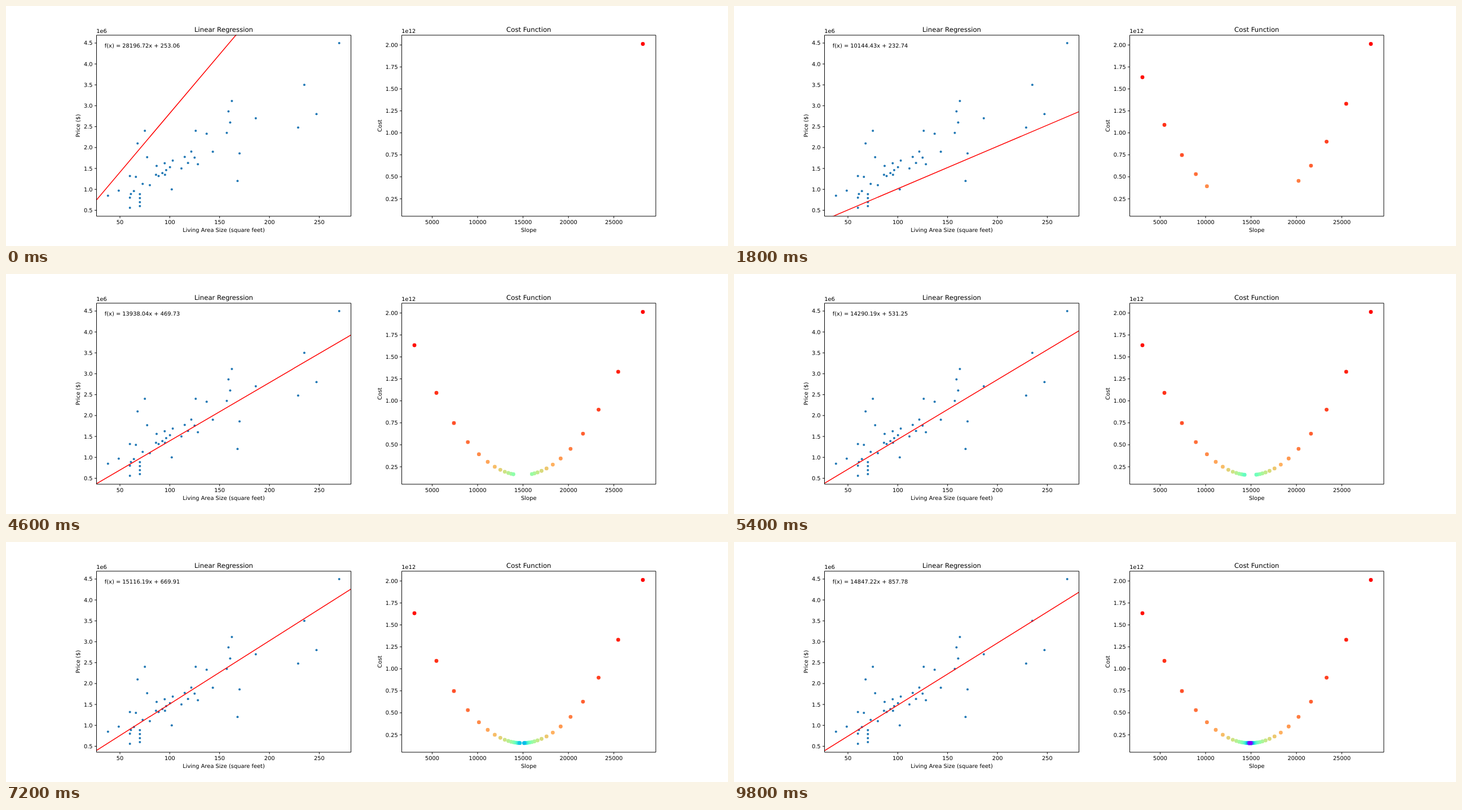
Animation, 1280 px wide and 427 px high, one loop 10 s. Source, as an HTML page:

```html
<!DOCTYPE html>
<html lang="en">
<head>
<meta charset="utf-8">
<title>Gradient descent</title>
<style>
  html, body { margin: 0; width: 100%; height: 100%; overflow: hidden; background: #fff; }
  svg { display: block; width: 1280px; height: 427px; }
  text { font: 9.877px "DejaVu Sans", sans-serif; text-rendering: geometricPrecision; fill: #000; white-space: pre; }
  .title { font-size: 11.7px; }
  .mid { text-anchor: middle; }
  .end { text-anchor: end; }
  .axis { fill: none; stroke: #000; stroke-width: 0.98; }
  .house { fill: #1f77b4; }
</style>
</head>
<body>
<svg id="stage" viewBox="0 0 1280 427">
  <clipPath id="plot"><rect x="160" y="51.2" width="451" height="322.4"/></clipPath>
</svg>
<script>
const STEP = 200, STEPS = 50;
const TOP = 51.9, BOTTOM = 374;
const stage = document.getElementById('stage');

function add(tag, attrs, text) {
  const el = document.createElementNS('http://www.w3.org/2000/svg', tag);
  for (const name in attrs) el.setAttribute(name, attrs[name]);
  if (text) el.textContent = text;
  return stage.appendChild(el);
}

const range = (from, step, n) => Array.from({ length: n }, (_, i) => from + i * step);

// Data to pixel scales
const areaX = v => 160.3 + (v - 26.4) * 1.767;
const priceY = v => 373.6 - (v - 0.363) * 74.37;
const slopeX = v => 755.6 + (v - 5000) * 0.0161;
const costY = v => 343 - (v - 0.25) * 156.4;

// House by area and price in millions
const house = (area, price) =>
  add('circle', { cx: areaX(area), cy: priceY(price), r: 2, class: 'house' });

// Evenly spaced houses, every second one raised by zig
function run(n, area, price, dArea, dPrice, zig = 0) {
  for (let i = 0; i < n; i++)
    house(area + i * dArea, price + i * dPrice + (i % 2) * zig);
}

function drawHouses() {
  run(2, 38, 0.85, 10.8, 0.12);
  run(2, 60, 0.56, 0, 0.24);
  run(2, 61, 0.89, 3, 0.07);
  run(2, 60, 1.32, 6, -0.02);
  run(4, 70, 0.6, 0, 0.095);
  run(2, 72.8, 1.13, 7.2, -0.03);
  run(2, 86.2, 1.35, 9, 0);
  run(3, 86.8, 1.56, 8.1, 0.065);
  run(4, 88.8, 1.32, 3.8, 0.07);
  run(5, 111.7, 1.5, 3.3, 0.065, 0.21);
  run(4, 157.2, 2.35, 1.7, 0.125, 0.39);
  const strays = [
    [67.7, 2.1], [75, 2.4], [77.3, 1.77], [102, 1], [126, 2.4], [128.2, 1.6],
    [137, 2.33], [143.2, 1.9], [168, 1.2], [170, 1.86], [186.3, 2.7],
    [228.8, 2.48], [235, 3.5], [247.2, 2.8], [270, 4.5]
  ];
  strays.forEach(p => house(...p));
}

// Overshooting descent: the slope flips sides each step, the intercept drifts
function fit(k) {
  const swing = 13294.06 * Math.exp(-0.114186 * k) * (k % 2 ? -1 : 1);
  const drift = 14.6535 * k - 0.00034 * k * k;
  return {
    swing,
    slope: 14902.664 - 0.00843 * drift + swing,
    bias: 140.992 + drift + 0.00843 * swing
  };
}

function rainbow(x) {
  const rgb = [Math.abs(2 * x - 0.5), Math.sin(Math.PI * x), Math.cos(Math.PI * x / 2)];
  return `rgb(${rgb.map(c => Math.round(255 * Math.min(1, Math.max(0, c))))})`;
}

function costDot(k) {
  const { slope, swing } = fit(k);
  return add('circle', {
    cx: slopeX(slope),
    cy: 357.8 - 290.3 * (swing / 13294) ** 2,
    r: 3.42,
    fill: rainbow(1 - k / (STEPS - 1))
  });
}

function axes(o) {
  const { left, right } = o, mid = (left + right) / 2;
  let d = `M${left} ${TOP}H${right}V${BOTTOM}H${left}Z`;
  for (const v of o.xs) {
    const x = o.x(v);
    d += `M${x} ${BOTTOM}v3.5`;
    add('text', { x, y: 388, class: 'mid' }, String(v));
  }
  for (const v of o.ys) {
    const y = o.y(v);
    d += `M${left} ${y}h-3.5`;
    add('text', { x: left - 6.9, y: y + 3.5, class: 'end' }, v.toFixed(o.digits));
  }
  add('path', { d, class: 'axis' });
  add('text', { x: mid, y: 45.6, class: 'mid title' }, o.title);
  add('text', { x: mid, y: 402, class: 'mid' }, o.xName);
  add('text', { transform: `translate(${o.nameX} 213)rotate(-90)`, class: 'mid' }, o.yName);
  add('text', { x: left - 0.3, y: 48, class: 'power' }, o.power);
}

drawHouses();
const line = add('path', { stroke: '#f00', 'stroke-width': 1.48, 'clip-path': 'url(#plot)' });
const dots = range(0, 1, STEPS).map(costDot);

axes({
  left: 160.5, right: 611.6, x: areaX, y: priceY, digits: 1,
  xs: range(50, 50, 5), ys: range(0.5, 0.5, 9),
  title: 'Linear Regression', xName: 'Living Area Size (square feet)',
  yName: 'Price ($)', nameX: 130.5, power: '1e6'
});
axes({
  left: 701.6, right: 1152, x: slopeX, y: costY, digits: 2,
  xs: range(5000, 5000, 5), ys: range(0.25, 0.25, 8),
  title: 'Cost Function', xName: 'Slope',
  yName: 'Cost', nameX: 665.5, power: '1e12'
});
const formula = add('text', { x: 174.8, y: 74 });

let shown = -1;
function draw(k) {
  if (k === shown) return;
  shown = k;
  const { slope, bias } = fit(k);
  const at = v => `${areaX(v)} ${priceY((slope * v + bias) / 1e6)}`;
  line.setAttribute('d', `M${at(20)}L${at(290)}`);
  formula.textContent = `f(x) = ${slope.toFixed(2)}x + ${bias.toFixed(2)}`;
  dots.forEach((dot, i) => dot.setAttribute('visibility', i <= k ? 'visible' : 'hidden'));
}

const start = performance.now();
function tick() {
  draw(Math.floor((performance.now() - start) / STEP) % STEPS);
  requestAnimationFrame(tick);
}
tick();
</script>
</body>
</html>
```
